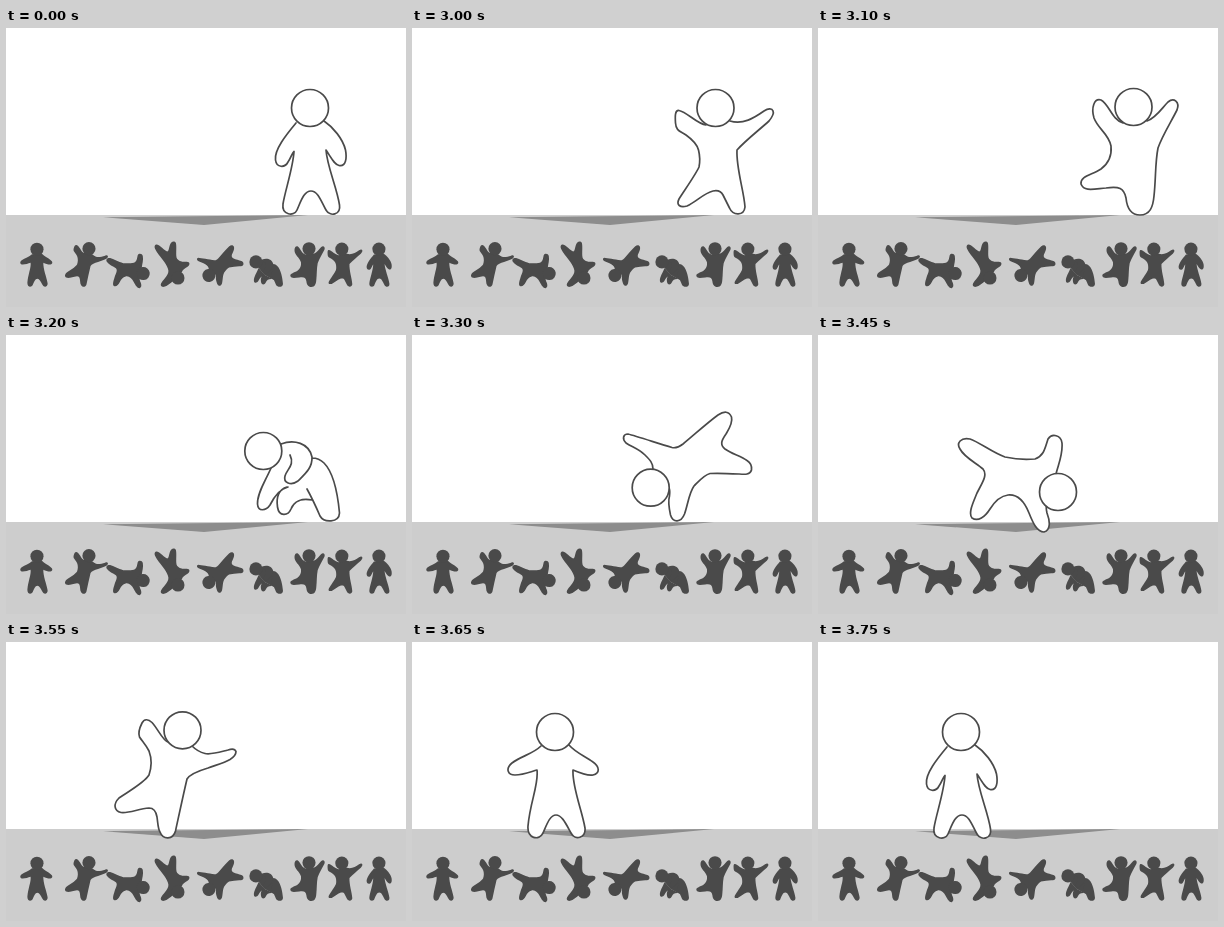
Animation of 400x279 px, one loop 6.85 s. Source, as an HTML page:

```html
<!DOCTYPE html>
<html lang="en">
<head>
<meta charset="utf-8">
<title>Cartwheel</title>
<style>
html, body { margin: 0; width: 100%; height: 100%; overflow: hidden; background: #fff; }
svg { display: block; width: 100vw; height: 100vh; }
</style>
</head>
<body>
<svg id="stage" viewBox="0 0 400 279" preserveAspectRatio="none">
  <rect width="400" height="279" fill="#fff"/>
  <rect y="187" width="400" height="92" fill="#cdcdcd"/>
  <path d="M97 189.2L302 187L198 197Z" fill="#8d8d8d"/>
</svg>
<script>
const LOOP = 6850, INK = '#4a4a4a', SMALL = 0.355;
const stage = document.getElementById('stage');

const standing = 'M290 95C280 107 268 122 269.5 132C270.5 140 279 140 282 134C285 130 286 125 288 123.5' +
  'C287 140 279 163 277 176C275.5 187 288 189 291 182C295 173 298 163 305 163C312 163 315 173 320 182' +
  'C324 189 335 187 333.5 177C331 160 321 138 320 122C326 131 328 136 333 137.5C340 139 341 130 339.5 122' +
  'C337 111 327 99 318 93';

// at: start time, head: centre, icon: offset of the small copy, turn: its tilt, core: fill without outline
const poses = [
  { at: 0, head: [304, 80], icon: [265, 192.7], line: standing },
  { at: 3000, head: [303.5, 80], icon: [228.1, 192.7], line:
    'M294 97C285 96 275 84 267 82.5C263 82 263 88 263.5 95C264 103 268 103 274 107C281 112 285 116 286.5 122' +
    'C288 128 288 134 287 139C284 146 272 163 267 171C264 177 268 180 275 178C284 174 292 165 301 163' +
    'C306 162 309 163 311 167L317.5 180C321 188 332 188 333 179C332 163 324 140 325 122' +
    'C334 112 346 103 357 93C361 88 362 85 361 83C360 80 356 80.5 352 83C342 90 331 97 318 93' },
  { at: 3100, head: [315.5, 79], icon: [191, 192.7], line:
    'M305 95C294 92 291 76 283 72C276 70 273 80 276 90C280 101 291 106 293 118C294 128 291 135 283 141' +
    'C274 147 262 148 263 156C266 164 276 161 288 160C301 158 306 160 308 170C309 180 313 187 322 187' +
    'C332 187 335 179 336 168C338 150 337 135 340 120C344 108 353 94 359 82C362 74 356 69 350 74' +
    'C344 80 338 90 329 93' },
  { at: 3200, head: [257.3, 116], icon: [158.6, 192.7],
    core: 'M265 133L275 109L306 123L320 132L308 167L281 152Z',
    line:
    'M265 133C260 145 251 158 251.5 169C252 177 260 176 264 170C268 162 273 154 282 152' +
    'M281 152C273 154 270 162 271.5 172C273 182 282 181 285 174C288 166 296 163 306 165' +
    'M301 154C306 163 311 174 314 181C318 188 333 188 333.5 178C332 162 328 138 318 128C314 124 310 123 306 123' +
    'M275 109C288 104 303 108 306 122C306.5 133 299 139 292 146C285 151 277 148 279 141C281 134 289 130 284 120' },
  { at: 3300, head: [238.7, 152.7], icon: [118.2, 193.2], turn: -8, line:
    'M241 134C241 128 238 125 233 120C227 114 220 112 214 108C210 104 211 99 216 99C224 101 245 108 260 112.5' +
    'C264 113.5 267 112 271 109C282 100 295 88 306 80C312 76 317 76 319.5 82C321 88 317 94 314 99' +
    'C309 106 308 110 313 114C320 119 329 121 335 125.5C339 128 340 131 339.5 135C338 140 333 139.5 327 139' +
    'C317 138.5 307 138 298 138.5C292 140 287 146 282 151C277 158 276 169 272.5 179C269 188 261 188 258.5 180' +
    'C257 173 256 166 257.5 161C258 157 258 155 257 153' },
  { at: 3400, head: [272, 158], icon: [75.4, 193.9], line:
    'M257 168C250 173 242 181 233 183C224 184 221 178 226 171C233 160 246 150 245 137C243 121 228 107 212 84' +
    'C204 72 205 66 211 64C219 63 228 76 240 83C246 85 246 76 249 66C252 54 262 52 266 59' +
    'C269 70 266 88 268 100C272 111 285 113 297 112C306 112 307 121 299 126C291 131 285 134 283 142' },
  { at: 3450, head: [240, 157], icon: [52, 189.8], turn: -6, line:
    'M238 139C240 130 245 120 244 108C243 100 234 98 230 104C227 113 226 121 217 124C207 125 196 124 187 122' +
    'C175 118 161 107 152 104C143 102 138 108 142 114C146 122 158 128 165 134C170 140 164 148 159 158' +
    'C155 168 150 178 154 183C160 187 167 182 172 174C177 166 182 161 190 160C200 159 207 168 211 178' +
    'C215 188 219 197 226 197C233 195 232 186 229 178C228 174 228 171 229 169' },
  { at: 3550, head: [176.5, 88.3], icon: [20.3, 189.3], line:
    'M162 100C157 99 152 87 146 80.5C142 76.5 138 77 136 81C134 85 132 91 133.5 95C136 99 140 103 143 109' +
    'C146 117 146 124 143 133C138 141 123 149 113 156C107 162 108 169 115 170.5C123 171.5 132 167 143 166' +
    'C148 166 150 169 151 175C152 182 152 187 154 190C157 198 167 198 169.5 189C173 173 177 154 181 137' +
    'C184 132 192 129 202 126C210 123 218 121 224 117.5C228 115 230 112 230 109.5C229 107 226 106.5 222 108' +
    'C214 110 205 113 199 111.5C193 110 189 107 186 104' },
  { at: 3650, head: [143, 90], icon: [-19.8, 189.3], line:
    'M129 104C121 112 109 114 100 121C93 127 96 133 103 133C111 133 118 130 125 128C127 142 118 160 116 184' +
    'C115 197 127 199 131 191C135 182 138 173 144 173C150 173 154 182 159 191C163 199 174 196 173 186' +
    'C170 168 160 145 161 128C168 131 176 134 181 133C188 131 188 125 181 120C173 114 164 111 157 103' },
  { at: 3750, head: [304, 80], shift: [-161, 10], line: standing }
];

function add(parent, tag, attrs) {
  const el = document.createElementNS('http://www.w3.org/2000/svg', tag);
  for (const key in attrs) el.setAttribute(key, attrs[key]);
  return parent.appendChild(el);
}

function drawFigure(pose, fill, stroke, transform) {
  const g = add(stage, 'g', { fill, stroke, transform, 'stroke-width': 1.7,
    'stroke-linecap': 'round', 'stroke-linejoin': 'round' });
  if (pose.core) add(g, 'path', { d: pose.core, stroke: 'none' });
  add(g, 'path', { d: pose.line });
  add(g, 'circle', { cx: pose.head[0], cy: pose.head[1], r: 18.5 });
  return g;
}

for (const p of poses) {
  if (p.icon) drawFigure(p, INK, 'none', `translate(${p.icon}) scale(${SMALL}) rotate(${p.turn || 0},${p.head})`);
}
const figures = poses.map(p => drawFigure(p, '#fff', INK, `translate(${p.shift || [0, 0]})`));

function render(t) {
  const now = poses.filter(p => p.at <= t).length - 1;
  figures.forEach((g, i) => g.setAttribute('visibility', i === now ? 'visible' : 'hidden'));
}

const start = performance.now();
function tick() {
  render((performance.now() - start) % LOOP);
  requestAnimationFrame(tick);
}
render(0);
requestAnimationFrame(tick);
</script>
</body>
</html>
```
